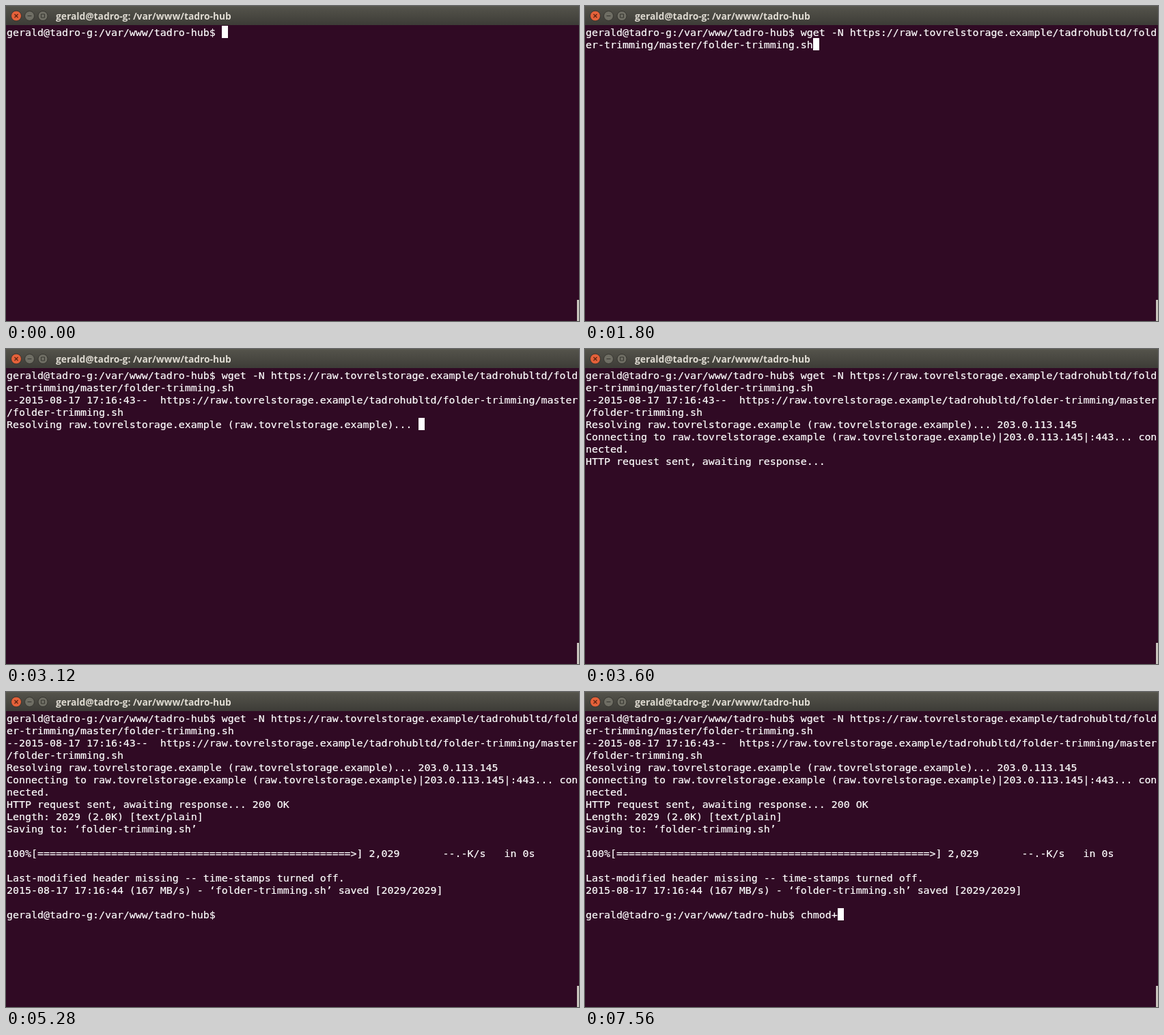
Animation of 839 by 462 pixels, one loop 8000 ms. Source, as an HTML page:

```html
<!DOCTYPE html>
<html lang="en">
<head>
<meta charset="utf-8">
<title>Terminal</title>
<style>
  html, body { margin: 0; width: 100%; height: 100%; overflow: hidden; background: #300a24; }
  #window { position: relative; width: 839px; height: 462px; overflow: hidden; background: #300a24; }
  #bar {
    position: absolute; left: 0; top: 0; width: 839px; height: 28px;
    background: linear-gradient(#5b5a50 0, #53524a 2px, #3d3c37 100%);
  }
  #bar svg { position: absolute; left: 0; top: 0; }
  #title {
    position: absolute; left: 73px; top: 1px; white-space: pre; color: #dfdbd2;
    font: bold 13.8px/28px "Open Sans", sans-serif;
  }
  #screen {
    position: absolute; left: 1px; top: 30px; margin: 0; color: #fff;
    font: 14.949px/18px "DejaVu Sans Mono", monospace; font-variant-ligatures: none;
    -webkit-text-stroke: .2px #fff;
  }
  #cursor { position: absolute; width: 9px; height: 18px; background: #fff; }
  #thumb { position: absolute; left: 836px; top: 431px; width: 3px; height: 31px; background: #c9c5be; }
</style>
</head>
<body>
<div id="window">
  <div id="bar">
    <svg width="70" height="28" fill="none">
      <circle cx="15" cy="14.5" r="7.5" fill="#e4613a" stroke="#35342f"/>
      <path d="M12.5 12l5 5m0-5l-5 5" stroke="#5a2412" stroke-width="1.3"/>
      <g fill="#6f6e64" stroke="#35342f">
        <circle cx="34.5" cy="14.5" r="7"/>
        <circle cx="54" cy="14.5" r="7"/>
        <path d="M31.5 14.5h6M51.5 12h5v5h-5z"/>
      </g>
    </svg>
    <div id="title"></div>
  </div>
  <pre id="screen"></pre>
  <div id="cursor"></div>
  <div id="thumb"></div>
</div>
<script>
const LOOP = 8000, COLS = 93, CELL_W = 9, CELL_H = 18, LEFT = 1, TOP = 29;
const $ = id => document.getElementById(id);

const user = 'gerald@tadro-g', dir = '/var/www/tadro-hub';
const host = 'raw.tovrelstorage.example', ip = '203.0.113.145';
const file = 'folder-trimming.sh';
const url = `https://${host}/tadrohubltd/folder-trimming/master/${file}`;
const prompt = `${user}:${dir}$ `;

const command = `${prompt}wget -N ${url}`;
const resolving = `${command}\n--2015-08-17 17:16:43--  ${url}\nResolving ${host} (${host})... `;
const connected = `${resolving}${ip}\nConnecting to ${host} (${host})|${ip}|:443... connected.\n`;
const request = `${connected}HTTP request sent, awaiting response... `;
const done = `${request}200 OK
Length: 2029 (2.0K) [text/plain]
Saving to: ‘${file}’

100%[${'='.repeat(51)}>] 2,029       --.-K/s   in 0s

Last-modified header missing -- time-stamps turned off.
2015-08-17 17:16:44 (167 MB/s) - ‘${file}’ saved [2029/2029]

${prompt}`;

// [start in ms, text, cursor visible]
const steps = [
  [0, prompt, true],
  [480, prompt, false],
  [960, prompt, true],
  [1800, command, true],
  [2400, command, false],
  [3120, resolving, true],
  [3240, connected, true],
  [3600, request, false],
  [3840, done, false],
  [4200, done, true],
  [5280, done, false],
  [5760, done + 'c', true],
  [6240, done + 'ch', true],
  [6720, done + 'ch', false],
  [6840, done + 'chm', true],
  [7200, done + 'chmo', true],
  [7560, done + 'chmod+', true]
];

// Hard wrap at the terminal width
const wrap = text => text.split('\n').flatMap(line => {
  const rows = [];
  do {
    rows.push(line.slice(0, COLS));
    line = line.slice(COLS);
  } while (line);
  return rows;
});

function show([, text, visible]) {
  const rows = wrap(text), last = rows.length - 1;
  $('screen').textContent = rows.join('\n');
  const style = $('cursor').style;
  style.left = LEFT + rows[last].length * CELL_W + 'px';
  style.top = TOP + last * CELL_H + 'px';
  style.visibility = visible ? 'visible' : 'hidden';
}

let current;
const start = performance.now();

function tick() {
  const t = (performance.now() - start) % LOOP;
  const step = steps.findLast(s => s[0] <= t);
  if (step !== current) show(current = step);
  requestAnimationFrame(tick);
}

$('title').textContent = `${user}: ${dir}`;
tick();
</script>
</body>
</html>
```
